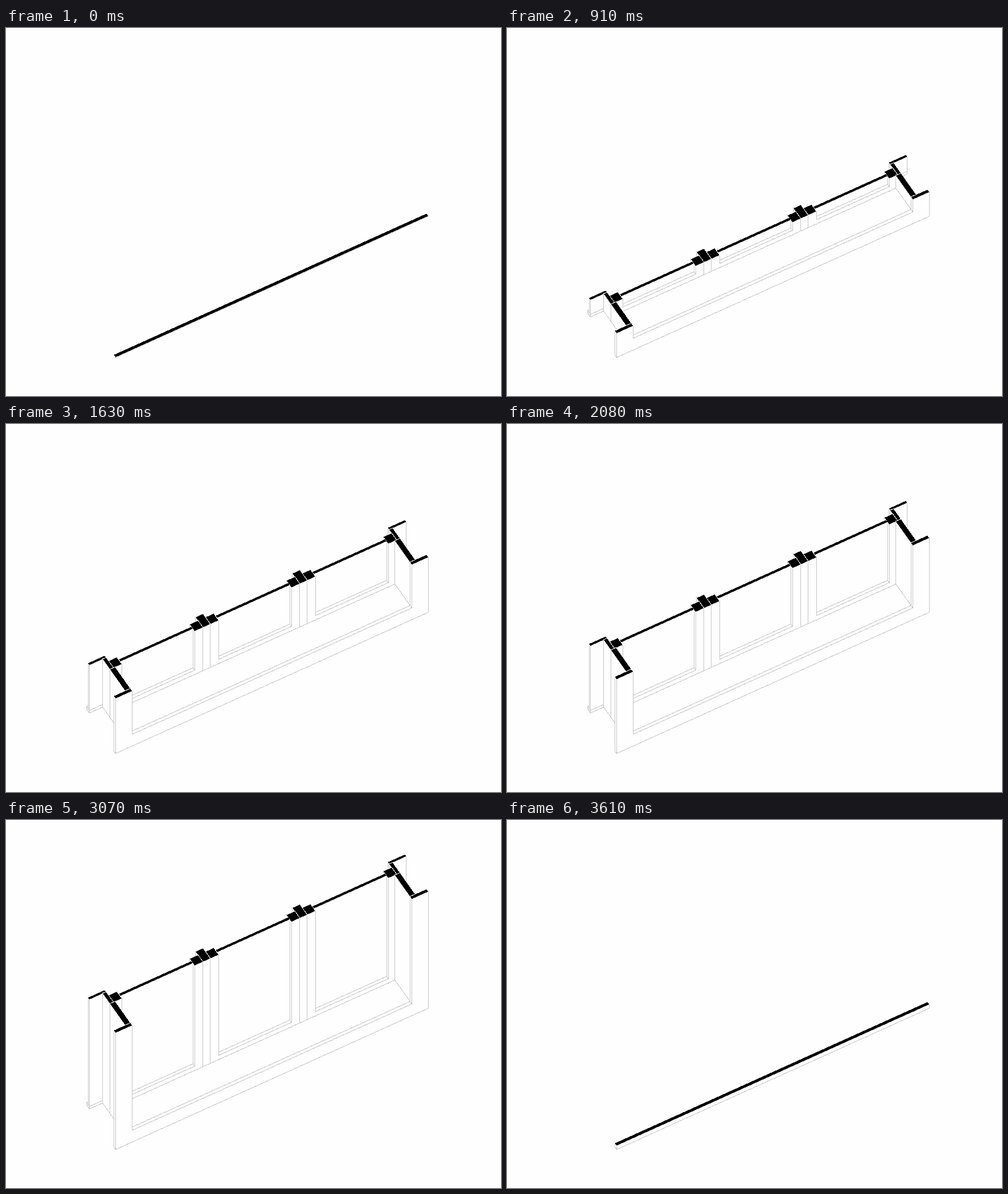
An HTML page for the animation above (3710 ms loop, 869 by 645 pixels).

```html
<!DOCTYPE html>
<html>
<head>
<meta charset="utf-8">
<title>Window section</title>
<style>
  html, body { margin: 0; height: 100%; overflow: hidden; background: #fefefe; }
  svg { display: block; width: 869px; height: 645px; shape-rendering: crispEdges; }
  path { fill: #fefefe; stroke: #c4c4c4; stroke-width: 1; }
  .cut { fill: #000; stroke: none; }
  .gap { fill: none; stroke: #fefefe; }
</style>
</head>
<body>
<svg id="stage" viewBox="0 0 869 645"></svg>
<script>
const stage = document.getElementById('stage');
const LOOP = 3710, START = 370, END = 3610, STEP = 90;
let h, out;

// u runs along the wall, v into the depth, z up
const point = ([u, v, z]) =>
  (192.5 + u - 0.71 * v).toFixed(2) + ' ' + (577.5 - 0.451 * u - v - z).toFixed(2);

function line(points, cls = '', end = '') {
  out += `<path class="${cls}" d="M${points.map(point).join('L')}${end}"/>`;
}

const face = (points, cls) => line(points, cls, 'Z');

function lid(u0, u1, v0, v1, z, isCut) {
  const corners = [[u0, v0, z], [u1, v0, z], [u1, v1, z], [u0, v1, z]];
  face(corners, isCut ? 'cut' : '');
  // part the cut from the pieces behind it and to its right
  if (isCut) line(corners.slice(1), 'gap');
}

// A block clipped by the cutting plane at height h
function box(u0, u1, v0, v1, z0, z1 = 1e4) {
  if (h <= z0) return;
  const z = Math.min(z1, h);
  face([[u0, v0, z0], [u0, v1, z0], [u0, v1, z], [u0, v0, z]]);
  face([[u0, v0, z0], [u1, v0, z0], [u1, v0, z], [u0, v0, z]]);
  lid(u0, u1, v0, v1, z, z1 > h);
}

// Two uprights of width w joined by a bottom rail, with one unbroken front
function frame(u0, u1, w, v0, v1, z0, zr, glazed) {
  if (h <= zr) return box(u0, u1, v0, v1, z0);
  const a = u0 + w, b = u1 - w;
  box(b, u1, v0, v1, z0);
  box(a, b, v0, v1, z0, zr);
  // redraw the upright's side above the rail
  face([[b, v0, zr], [b, v1, zr], [b, v1, h], [b, v0, h]]);
  if (glazed) box(a, b, 46.2, 50, zr);
  box(u0, a, v0, v1, z0);
  face([[u0, v0, z0], [u1, v0, z0], [u1, v0, h], [b, v0, h],
        [b, v0, zr], [a, v0, zr], [a, v0, h], [u0, v0, h]]);
  lid(b, u1, v0, v1, h, true);
  lid(u0, a, v0, v1, h, true);
}

function draw() {
  out = '';
  // outside sill and casings
  box(-3.4, 553, 60, 67, 12.5, 17);
  box(523, 553, 60, 63.5, 17);
  box(-3.4, 26, 60, 63.5, 17);
  // inner sill, then stops, sashes and mullions from right to left
  box(29, 529, 4, 60, 12, 20.5);
  box(523, 529, 42, 60, 20.5);
  for (let i = 2; i >= 0; i--) {
    const u = 26 + 170 * i;
    frame(u, u + 157, 14.5, 42, 54, 20.5, 28, true);
    if (i) box(u - 13, u, 42, 60, 20.5);
  }
  box(20, 26, 42, 60, 12);
  // jambs and inside casing
  box(520, 529, 4, 42, 20.5);
  box(20, 29, 4, 42, 12);
  frame(0, 549, 29, 0, 4.4, 0, 20.5);
  stage.innerHTML = out;
}

function heightAt(t) {
  if (t < START) return 0.7;
  if (t >= END) return 7;
  return 2.2 + 6.75 * Math.floor((t - START) / STEP);
}

function tick() {
  const next = heightAt(performance.now() % LOOP);
  if (next !== h) {
    h = next;
    draw();
  }
  requestAnimationFrame(tick);
}
tick();
</script>
</body>
</html>
```
